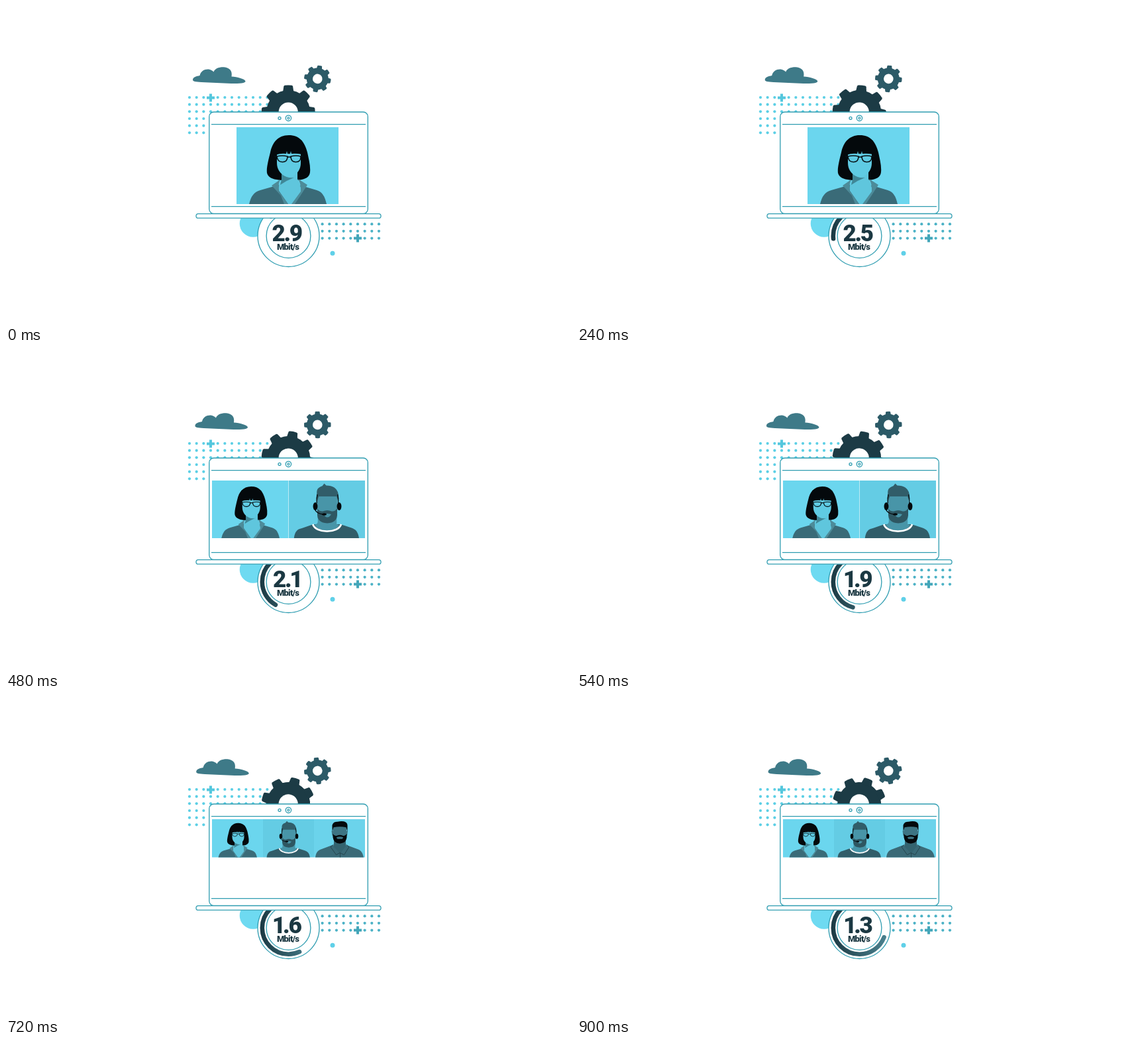
An HTML page for the animation above (0.96 s loop, 853x480 px).

```html
<!DOCTYPE html>
<html lang="en">
<head>
<meta charset="utf-8">
<title>Video call bandwidth</title>
<style>
  html, body { margin: 0; width: 100%; height: 100%; overflow: hidden; background: #fff; }
  svg { display: block; width: 853px; height: 480px; }
  .line { fill: none; stroke: #2f9db1; stroke-width: 1.3; }
  .box { fill: #fff; stroke: #2f9db1; stroke-width: 1.3; }
  text { font-family: Roboto, Arial, sans-serif; font-weight: 800; fill: #1b3842; text-anchor: middle; font-feature-settings: "pnum"; }
</style>
</head>
<body>
<svg viewBox="0 0 853 480">
  <defs>
    <linearGradient id="arcFill" gradientUnits="userSpaceOnUse" x1="384" y1="0" x2="468" y2="0">
      <stop offset="0" stop-color="#1b3943"/>
      <stop offset="1" stop-color="#4a8290"/>
    </linearGradient>
    <clipPath id="frame"><rect width="154" height="116"/></clipPath>
    <path id="tooth" d="M-8.2-30L-6.9-38.6Q-6.6-40-5-40.2Q0-40.8 5-40.2Q6.6-40 6.9-38.6L8.2-30Z"/>
    <path id="plus" d="M-6 0H6M0-6V6" fill="none" stroke-width="4"/>

    <g id="woman" clip-path="url(#frame)">
      <rect width="154" height="116" fill="#6bd6ee"/>
      <path fill="#04090c" d="M79 12C62 12 54 24 51 38C48 50 45 62 46 69C48 77 57 79 67 80H92C103 79 110 76 111 68C112 58 109 48 107 38C103 22 95 12 79 12Z"/>
      <path fill="#3a6b78" d="M19 116C22 104 26 98 36 95L64 87H94L121 95C130 98 133 104 136 116Z"/>
      <path fill="#5fc6dd" d="M68 66V79Q62 88 64 96L78 116H87L98 98Q97 86 92 78V66Z"/>
      <path fill="#3f8797" d="M68 69Q75 78 87 76Q76 80 66 87L68 79Z"/>
      <path fill="#4d8b99" d="M66 79L53 88L67 103L72 116H78L64 97Q62 88 66 79ZM93 78L107 87L96 104L88 116H83L97 97Q98 87 93 78Z"/>
      <path fill="#5fcbe3" d="M61 36H97V54C97 66 88 75 79 75C70 75 61 66 61 54Z"/>
      <path fill="#04090c" d="M59 20H99V41Q90 39 83 40L82 36L81 40H77L76 36L75 40Q66 39 59 42Z"/>
      <g fill="none" stroke="#071216" stroke-width="1.5">
        <path d="M61 44Q69 42 77 44Q77 52 70 52.5Q62 53 61 44ZM82 44Q90 42 97 44Q97 53 89 52.5Q82 52 82 44ZM77 45.5Q79.5 44 82 45.5M57 44H61M97 44H101"/>
      </g>
    </g>

    <g id="host" clip-path="url(#frame)">
      <rect width="154" height="116" fill="#64cce4"/>
      <path fill="#315d69" d="M11 116C13 103 17 98 27 96L50 88H104L126 95C136 98 140 104 142 116Z"/>
      <path fill="#4895a8" d="M59 72H97V88Q101 90 103 89Q95 101 78 101Q60 101 52 89Q59 88 59 82Z"/>
      <path fill="none" stroke="#fff" stroke-width="3.6" d="M49 88C55 107 100 107 106 88"/>
      <path fill="#4895a8" d="M58 28H98V64Q97 82 78 84Q59 82 58 64Z"/>
      <path fill="#2e5762" d="M58 57Q64 63 69 62Q78 58 87 62Q93 63 98 56V70Q97 85 78 86Q59 85 58 70Z"/>
      <path fill="#4895a8" d="M71 68Q78 65 86 68Q82 74 78 74Q74 74 71 68Z"/>
      <path fill="#315d69" d="M57 44V24C57 15 63 13 68 11L72 6L76 10Q96 10 100 26V44L97 32H61Z"/>
      <g fill="#04090c">
        <ellipse cx="54" cy="52" rx="4.6" ry="8"/>
        <ellipse cx="102" cy="52" rx="4.6" ry="8"/>
        <ellipse cx="72" cy="68" rx="4.5" ry="2.3"/>
      </g>
      <path fill="none" stroke="#04090c" stroke-width="1.8" d="M53 58Q57 67 70 68M57 46Q56 36 58 28M100 46Q101 36 99 28"/>
    </g>

    <g id="guest" clip-path="url(#frame)">
      <rect width="154" height="116" fill="#6bd3eb"/>
      <path fill="#3a6a77" d="M4 116C6 101 11 95 22 91L54 79H100L132 91C143 95 147 102 150 116Z"/>
      <path fill="#34636f" d="M60 60H96V82L79 104L60 84Z"/>
      <path fill="none" stroke="#25464f" stroke-width="2" d="M59 77L50 84L67 108L78 102L91 108L106 84L97 77M79 103V116"/>
      <path fill="#3d7483" d="M57 22H98V50Q97 70 78 72Q59 70 57 50ZM53 36H58V50H55ZM98 36H102L100 50H97Z"/>
      <path fill="#04090c" d="M55 38V23C54 14 61 7 71 8Q84 5 93 8Q102 11 101 23V38L97 25Q78 21 59 25Z"/>
      <path fill="#04090c" fill-rule="evenodd" d="M57 44Q62 53 69 50Q78 46 87 50Q94 53 99 44V55Q97 73 78 74Q59 73 57 55ZM68 55Q69 61 73 60H83Q87 61 88 55Q78 51 68 55Z"/>
    </g>
  </defs>

  <g id="dots"></g>
  <use href="#plus" x="309" y="138.4" stroke="#55c7dd"/>
  <use href="#plus" x="531" y="350.4" stroke="#43a6b9"/>
  <circle cx="493" cy="373.3" r="3.5" fill="#5fd0e8"/>
  <circle cx="373" cy="328.5" r="20.3" fill="#6edaf1"/>

  <path id="cloud" fill="#3e7a88" d="M282 111.5C282 107 288 106 292.5 105C294 98 300 95 306 95.5C310 96 312 98 313.5 99.5C315 94.5 321 92 329 92.2C338 93 342 98 340.500 106.500C349 107 361 110 361.500 113.500C362 116.500 353 117 340 117L295 115C286 114.500 282 114 282 111.500Z"/>
  <g id="bigGear" fill="#1c3b45"></g>
  <g id="smallGear" fill="#2c5a67"></g>

  <circle class="box" cx="426.500" cy="347" r="46.500"/>
  <path id="arc" fill="none" stroke="url(#arcFill)" stroke-width="6.600" stroke-linecap="round" pathLength="360" d="M426.500 307.300a39.700 39.700 0 0 0 0 79.400a39.700 39.700 0 0 0 0-79.400"/>
  <circle class="box" cx="426.500" cy="347" r="33.400"/>
  <text id="rate" x="423.700" y="354.600" font-size="35" letter-spacing="-2.300"></text>
  <text x="425.600" y="368" font-size="13" letter-spacing="-0.800">Mbit/s</text>

  <rect class="box" x="306.800" y="160" width="239.500" height="153.500" rx="7"/>
  <path class="line" d="M310 178.700H543M310 302.700H543"/>
  <circle class="line" cx="413" cy="169.300" r="2"/>
  <circle class="line" cx="426.400" cy="169.300" r="4.200"/>
  <circle class="line" cx="426.400" cy="169.300" r="1.500"/>
  <rect class="box" x="287" y="313.600" width="279" height="6.600" rx="3.300"/>
  <g id="call"></g>
</svg>
<script>
  const FRAME = 60, FRAMES = 16;
  const $ = id => document.getElementById(id);

  function dots(x0, y0, cols, rows, color) {
    let out = '';
    for (let r = 0; r < rows; r++)
      for (let c = 0; c < cols; c++)
        out += `<circle cx="${x0 + c * 10.67}" cy="${y0 + r * 10.67}" r="2.1" fill="${color}"/>`;
    return out;
  }

  function gear() {
    let out = '<circle r="33"/>';
    for (let a = 0; a < 360; a += 45) out += `<use href="#tooth" transform="rotate(${a})"/>`;
    return out + '<circle r="14.6" fill="#fff"/>';
  }

  // People side by side, each in a 154 x 116 panel
  function tiles(names, x, y, scale) {
    return names.map((name, i) =>
      `<use href="#${name}" transform="translate(${x + i * 154 * scale} ${y}) scale(${scale})"/>`).join('');
  }

  $('dots').innerHTML = dots(277, 138, 12, 6, '#5bcfe5') + dots(477.6, 329.2, 9, 3, '#4cb2c6');
  $('bigGear').innerHTML = $('smallGear').innerHTML = gear();

  const layouts = [
    { from: 0, art: tiles(['woman'], 348, 183, 1) },
    { from: 480, art: tiles(['woman', 'host'], 311, 194, 0.75) },
    { from: 720, art: tiles(['woman', 'host', 'guest'], 311, 182.7, 0.5) }
  ];
  let shown = null;

  function draw(t) {
    const step = Math.floor(t / FRAME) % FRAMES;
    const n = Math.ceil(step * 2.75); // ticks of the finer inner clock
    $('cloud').setAttribute('transform', `translate(${n * 0.157})`);
    $('bigGear').setAttribute('transform', `translate(426.2 160) rotate(${n * 0.48})`);
    $('smallGear').setAttribute('transform', `translate(470.3 109.900) scale(.5) rotate(${10 - n * 0.48})`);
    $('arc').setAttribute('stroke-dasharray', `${42 + n * 4.93} 720`);
    $('rate').textContent = (2.9 - n * 0.0385).toFixed(1);
    const layout = layouts.findLast(l => step * FRAME >= l.from);
    if (layout !== shown) $('call').innerHTML = (shown = layout).art;
  }

  function tick() {
    draw(performance.now());
    requestAnimationFrame(tick);
  }
  tick();
</script>
</body>
</html>
```
